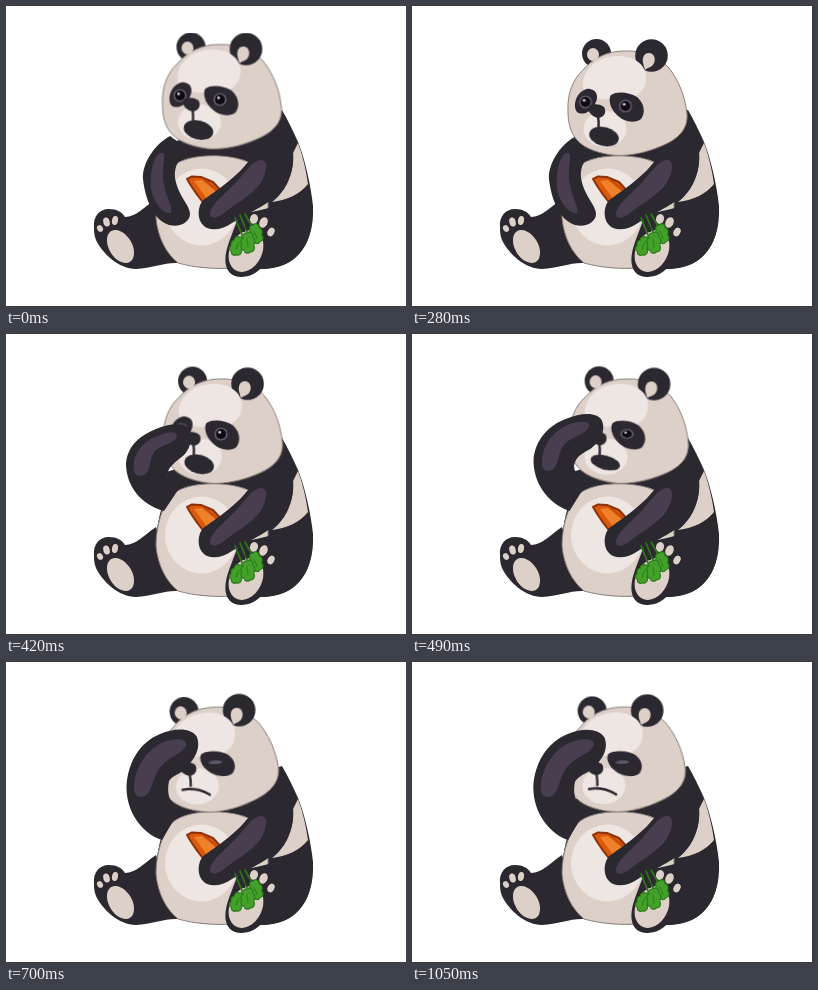
These frames come from a looping animation (400 by 300 pixels, 1.12 s). An HTML page without scripts:

```html
<!DOCTYPE html>
<html lang="en">
<head>
<meta charset="utf-8">
<title>Panda facepalm</title>
<style>
html, body { margin: 0; width: 100%; height: 100%; overflow: hidden; background: #fff; }
svg { display: block; width: 100vw; height: 100vh; }
.dark { fill: #2b2830; }
.cream { fill: #ddd0c9; }
.light { fill: #ede6e3; }
.sheen { fill: #493e4f; }
.edge { stroke: #8b807b; stroke-width: 1; }
.line { fill: none; stroke: #2b2830; stroke-width: 2.4; stroke-linecap: round; }

.head, .patch, .eye, .pupil, .gape, .frown, .rest, .raised, .raised path {
  animation: 1120ms step-end infinite;
}
.patch, .eye, .gape { transform-box: fill-box; transform-origin: center; }
.head { transform-origin: 215px 150px; animation-name: nod; }
.patch { animation-name: squint; }
.eye { animation-name: lid; }
.pupil, .rest { animation-name: hide; }
.gape { animation-name: shut; }
.frown { animation-name: frown; }
.pupil { animation-name: pupil; }
.raised { animation-name: raised; }
.raised .dark { animation-name: lift; }
.raised .sheen { animation-name: lift-sheen; }

/* the pose advances every 70 ms, one sixteenth of the loop */
@keyframes nod {
  0% { transform: translate(.5px, -6.5px) rotate(0deg); animation-timing-function: steps(4); }
  25% { transform: translate(0px, 0px) rotate(0deg); animation-timing-function: steps(2); }
  37.5% { transform: translate(1px, 0px) rotate(.6deg); animation-timing-function: steps(2); }
  50% { transform: translate(0px, 0px) rotate(1.8deg); animation-timing-function: steps(2); }
  62.5% { transform: translate(0px, 0px) rotate(-3.6deg); animation-timing-function: steps(6); }
  100% { transform: translate(0px, 0px) rotate(-2.2deg); }
}
@keyframes squint {
  0%, 37.5% { transform: scaleY(1); }
  43.75% { transform: scaleY(.98); }
  50% { transform: scaleY(.95); }
  56.25%, 100% { transform: translateY(.5px) scaleY(.88); }
}
@keyframes lid {
  0%, 37.5% { transform: scaleY(1); }
  43.75% { transform: scaleY(.75); }
  50% { transform: scaleY(.5); }
  56.25%, 100% { transform: translate(-1px, 0) scaleY(.27); }
}
@keyframes pupil {
  0% { visibility: visible; }
  56.25%, 100% { visibility: hidden; }
}
@keyframes shut {
  0%, 37.5% { transform: translateY(0) scaleY(1); visibility: visible; }
  43.75% { transform: translateY(-1.5px) scaleY(.75); }
  50% { transform: translateY(-3.5px) scaleY(.38); visibility: visible; }
  56.25%, 100% { visibility: hidden; }
}
@keyframes frown {
  0% { visibility: hidden; }
  56.25%, 100% { visibility: visible; }
}
@keyframes hide {
  0% { visibility: visible; }
  31.25%, 100% { visibility: hidden; }
}
@keyframes raised {
  0% { visibility: hidden; }
  31.25%, 100% { visibility: visible; }
}
@keyframes lift {
  0%, 31.25% { d: path("M158 179C142 184 127 178 124 160C122 146 130 137 142 132C153 126 167 122 173 129C179 138 174 149 167 152C164 153 162 148 164 147C167 149 172 150 176 150Z"); }
  37.5% { d: path("M158 177C140 172 122 158 120 132C120 112 135 101 150 95C162 90 176 88 182 94C187 102 185 114 178 121C170 128 162 132 161 142C163 148 172 150 176 150Z"); animation-timing-function: steps(2); }
  50% { d: path("M157 177C140 170 123 150 123 124C124 100 140 80 160 74C172 69 189 67 196 76C203 88 192 100 180 108C172 110 165 112 163 122C162 134 166 142 173 149Z"); animation-timing-function: steps(2); }
  62.5% { d: path("M156 178C138 172 120 152 120.500 124C122 100 134 80 154 72C170 65 186 66 191 75C195 87 189 97 178 108C174 112 167 113 163 119C160 134 165 142 173 149Z"); animation-timing-function: steps(6); }
  100% { d: path("M156 178C139 172 121 152 121.500 124C123 100 136 80 156 72C172 65 188 67 193 76C197 88 191 98 179 108C174 112 167 113 163 120C160 134 165 142 173 149Z"); }
}
@keyframes lift-sheen {
  0%, 31.25% { d: path("M131 160C128 150 136 143 146 139C156 134 164 133 164 138C162 144 152 147 147 153C144 160 146 167 141 168C135 169 132 166 131 160Z"); }
  37.5% { d: path("M128 135C126 120 138 106 152 102C162 97 171 97 171 102C169 110 156 110 149 117C143 124 145 138 138 141C132 143 128 141 128 135Z"); animation-timing-function: steps(2); }
  50% { d: path("M132 122C133 105 146 84 165 78C178 75 186 78 183 83C178 92 162 94 154 106C148 116 148 128 141 131C135 133 131 130 132 122Z"); animation-timing-function: steps(2); }
  62.5% { d: path("M128 126C128 107 141 85 161 79C173 75 182 78 180 84C175 93 161 95 153 107C146 117 146 130 139 134C132 137 128 133 128 126Z"); animation-timing-function: steps(6); }
  100% { d: path("M129 126C129 107 142 85 163 79C175 75 184 78 182 84C177 93 162 95 154 107C147 117 147 130 140 134C133 137 129 133 129 126Z"); }
}
</style>
</head>
<body>
<svg viewBox="0 0 400 300" xmlns="http://www.w3.org/2000/svg">
  <defs>
    <path id="leaf" d="M0 0C4-2 7 1 6 5C9 8 8 12 6 14C8 18 5 22 2 21C-1 24-5 22-5 19C-9 18-9 14-7 12C-9 9-7 6-5 5C-6 2-3-1 0 0Z"/>
  </defs>

  <!-- left leg -->
  <path class="dark" d="M88 221C87 211 93 203 103 203C111 203 116 206 119 211C130 211 138 201 150 193L172 257C160 256 146 262 130 263C113 263 96 247 90 234C88 229 88 225 88 221Z"/>
  <g class="cream">
    <ellipse cx="114.500" cy="240.500" rx="11.500" ry="18" transform="rotate(-31 114.500 240.500)"/>
    <ellipse cx="94" cy="222.500" rx="2.800" ry="3.600" transform="rotate(-30 94 222.500)"/>
    <ellipse cx="100.500" cy="216" rx="3.200" ry="4.600" transform="rotate(-15 100.500 216)"/>
    <ellipse cx="109" cy="214.500" rx="3" ry="4.600" transform="rotate(10 109 214.500)"/>
  </g>

  <!-- torso -->
  <path class="dark" d="M160 138L276 104C282 114 287 125 292 136C299 153 305 180 307 200C308 222 302 238 293 248C284 258 272 262 258 263L200 262C165 255 150 235 150 212C150 190 156 168 164 154Z"/>
  <path class="cream edge" d="M166 161C156 172 150 192 150 212C152 232 160 247 172 257C190 262 208 263 225 262L262 225V180L242 156C222 147 180 147 166 161Z"/>
  <ellipse class="light" cx="195.500" cy="201" rx="36.500" ry="38.500"/>
  <path class="cream" d="M292 137C297 150 300 164 302 178C294 188 282 194 266 196C282 184 288 165 287 147Z"/>
  <path class="dark" d="M236 209C255 203 288 199 303 179C309 205 308 232 293 248C284 258 272 262 255 263H235Z"/>

  <!-- carrot root -->
  <path d="M181 173L186 170.500L195 171L207 176L218 188L203 203Q190 189 181 173Z" fill="#d9590d" stroke="#8f3208" stroke-width="2" stroke-linejoin="round"/>
  <path d="M188 175L196 174L213 188L204 197Z" fill="#f08128"/>
  <path d="M196 172Q203 177 215 188" fill="none" stroke="#b8480c" stroke-width="1.500"/>

  <!-- right arm -->
  <path class="dark" d="M242 156C233 168 216 181 200 192C192 196 190 212 197 219C203 226 216 224 226 217C240 208 253 203 264 195C281 184 289 165 287 146L270 135Z"/>
  <path class="sheen" d="M204 207C206 197 222 186 232 174C240 165 248 153 256 154C263 156 260 169 254 178C245 190 229 198 218 207C211 213 203 213 204 207Z"/>

  <g class="rest">
    <path class="dark" d="M164 130C146 140 136 160 137 173C139 192 147 214 163 219C174 222 184 216 184 208C184 199 172 190 169 172C168 160 172 152 186 146Z"/>
    <path class="sheen" d="M154 147C146 152 143 172 146 187C150 200 158 208 165 207C168 203 158 188 157 172C156 160 160 150 157 147Z"/>
  </g>

  <g class="head">
    <circle class="dark" cx="184.500" cy="47.500" r="14.500"/>
    <path class="cream edge" d="M156 105C155 88 161 73 171 64C181 52 196 45 212 45C232 44 248 52 257 62C267 75 273 90 275 108C276 122 268 133 247 141C235 146 220 149.500 206 149.500C188 148.500 172 142 166 135C158 127 156 116 156 105Z"/>
    <ellipse class="cream" cx="181" cy="48.500" rx="6" ry="6.500"/>
    <circle class="dark" cx="239.500" cy="49.500" r="16.300"/>
    <path class="cream" d="M231 57C230 50 233 47 237 47C242 47 244 53 242 57C240 62 236 61 233 64Z"/>
    <path class="light" d="M171 80C170 64 185 50 206 50C224 50 235 60 234 73C233 88 219 95 204 94C185 93 173 92 171 80Z"/>
    <ellipse class="light" cx="193" cy="123" rx="21.500" ry="18"/>
    <path class="dark" d="M178 83C185 84 187 91 183 98C180 106 170 110 165 106C161 101 163 91 169 86C172 84 175 82 178 83Z"/>
    <path class="dark patch" d="M199 89C205 85 217 86 225 91C232 97 234 106 229 113C223 118 211 116 204 108C198 102 196 93 199 89Z"/>
    <g id="eye" transform="translate(213.500 100)">
      <g class="eye">
        <circle r="6.600" fill="#5f5668"/>
        <g class="pupil">
          <circle r="4.900" fill="#0e0c12"/>
          <circle cx="-1.400" cy="-1.800" r="1.500" fill="#b9b3c0"/>
        </g>
      </g>
    </g>
    <use href="#eye" x="-40" y="-4"/>
    <path class="dark" d="M177 100C181 97 189 98 192 101C195 106 192 112 186 112C180 111 174 104 177 100Z"/>
    <path class="line" d="M186 110Q187 116 186.500 122"/>
    <g transform="translate(192 130.500) rotate(14)"><ellipse class="dark gape" rx="15" ry="9.500"/></g>
    <path class="line frown" d="M178 125.500Q192 123 205 132"/>
  </g>

  <g class="raised">
    <path class="dark" d="M158 177C140 172 122 158 120 132C120 112 135 101 150 95C162 90 176 88 182 94C187 102 185 114 178 121C170 128 162 132 161 142C163 148 172 150 176 150Z"/>
    <path class="sheen" d="M128 135C126 120 138 106 152 102C162 97 171 97 171 102C169 110 156 110 149 117C143 124 145 138 138 141C132 143 128 141 128 135Z"/>
  </g>

  <!-- right foot -->
  <path class="dark" d="M232 212C242 204 262 203 268 210C273 217 270 227 266 236C263 248 260 259 252 265C244 272 230 273 224 267C217 260 219 247 223 236Z"/>
  <g class="cream">
    <ellipse cx="240" cy="245" rx="16" ry="22" transform="rotate(27 240 245)"/>
    <ellipse cx="248" cy="213" rx="4" ry="5" transform="rotate(15 248 213)"/>
    <ellipse cx="257.500" cy="216.500" rx="4" ry="5.500" transform="rotate(25 257.500 216.500)"/>
    <ellipse cx="265" cy="226" rx="3.300" ry="4.500" transform="rotate(30 265 226)"/>
  </g>

  <!-- carrot greens -->
  <path d="M229 212L236 229M234 209L241 226M239 208L247 222" fill="none" stroke="#2c7419" stroke-width="1.800" stroke-linecap="round"/>
  <path d="M236 220L238 226M240 219L243 224" fill="none" stroke="#2b2830" stroke-width="3"/>
  <g fill="#43a029" stroke="#2a7a1a" stroke-width="1.300">
    <use href="#leaf" transform="translate(247 219) rotate(-18) scale(.85)"/>
    <use href="#leaf" transform="translate(233.500 231) rotate(14) scale(.85)"/>
    <use href="#leaf" transform="translate(241 227) rotate(-6) scale(.9)"/>
  </g>
  <path d="M233 236L230 243M241 233L242 241M248 225L251 232" fill="none" stroke="#2f861d" stroke-width="1.300" stroke-linecap="round"/>
</svg>
</body>
</html>
```
